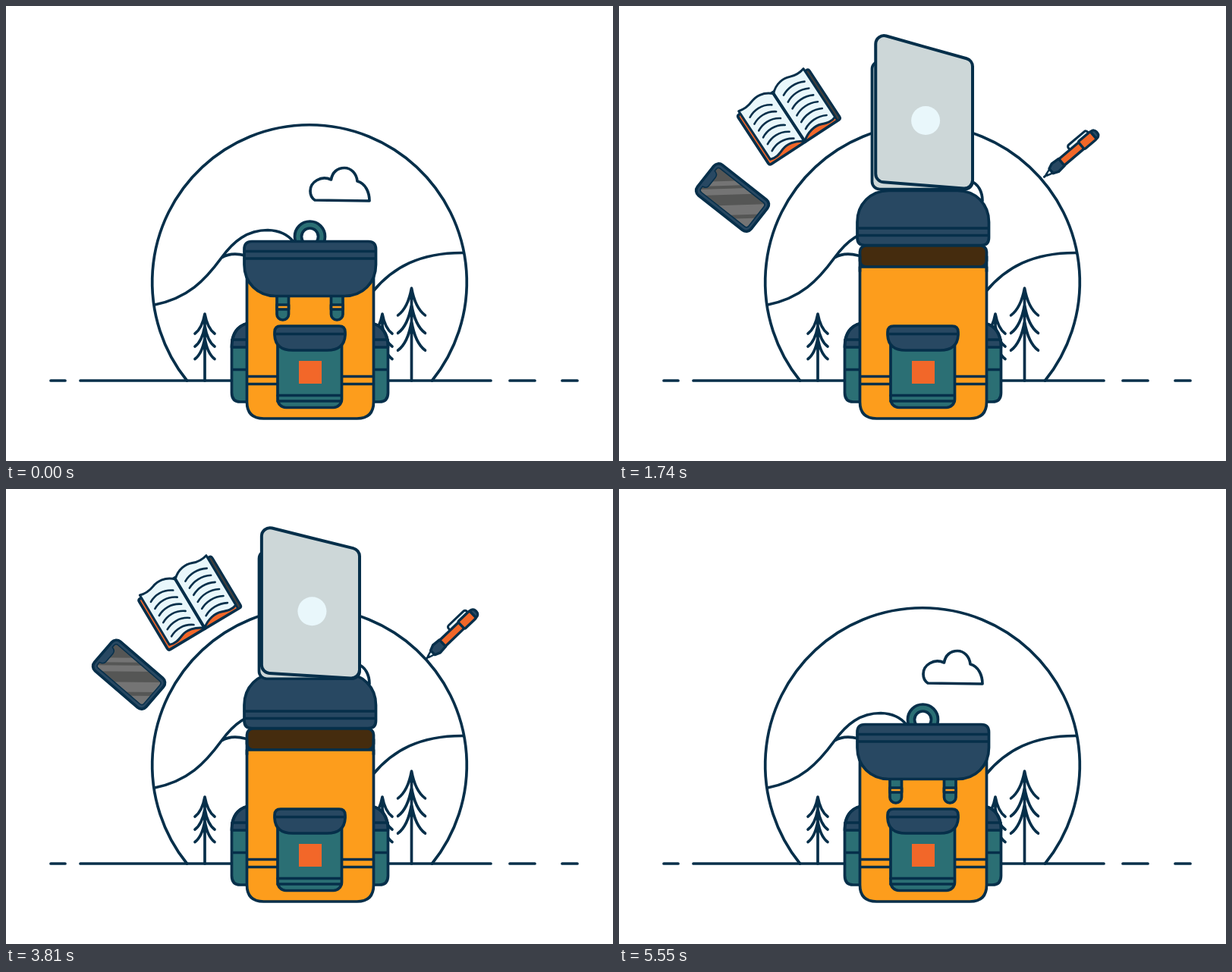
An HTML page with a canvas for the animation above (5610 ms loop, 800 by 600 pixels).

```html
<!DOCTYPE html>
<html lang="en">
<head>
<meta charset="utf-8">
<title>Backpack</title>
<style>
  html, body { margin: 0; width: 100%; height: 100%; overflow: hidden; background: #fff; }
  canvas { display: block; }
</style>
</head>
<body>
<canvas id="stage" width="800" height="600"></canvas>
<script>
const ctx = document.getElementById('stage').getContext('2d');
const LOOP = 5610, STEP = 30, MIDDLE = 2700;
const INK = '#062f4a', NAVY = '#284862', TEAL = '#2b6f74', AMBER = '#fd9d1c',
      ORANGE = '#f26729', BROWN = '#452c0e', SILVER = '#cdd7d8', PAPER = '#e9f7fb';

// Poses are keyed by the time distance from the middle of the flight.
const KEYS = [0, 585, 1050, 1290, 1560, 1740, 2040];
const PHONE = [[134, 260, -55.5], [135.5, 260, -54.5], [156, 249, -50.5], [192.5, 228, -43.5],
               [263.5, 228, -33], [324.5, 275, -23], [362, 397, -8]];
const BOOK = [[202.5, 141, -37], [204, 142, -36], [233, 149, -32], [284, 164, -25],
              [351, 224, -9], [386, 304, 6], [390, 397, 10]];
const PEN = [[608, 200, 55], [606, 200, 53.6], [591, 194, 48], [566.5, 186, 38],
             [513, 186.5, 17.5], [455, 226.5, -6.3], [440, 397, -14]];
// laptop: top, lid left shift, lid upper left lift, lid lower left lift
const LAPTOP = [[60.5, 8, 41, 14], [62, 7, 40, 13], [76, 4, 34, 9], [102, 1, 23, 4],
                [155, -2, 6, 0], [227, 0, 0, 0], [347, 0, 0, 0]];

const clamp = v => Math.min(1, Math.max(0, v));
const ramp = (t, a, b) => clamp((t - a) / (b - a));
const ease = v => v < .5 ? 4 * v ** 3 : 1 - (2 - 2 * v) ** 3 / 2;

// Smooth interpolation through the keyed poses.
function pose(rows, time) {
  let i = 0;
  while (i < KEYS.length - 2 && time > KEYS[i + 1]) i++;
  const span = KEYS[i + 1] - KEYS[i], u = clamp((time - KEYS[i]) / span);
  return rows[0].map((_, c) => {
    const slope = k => {
      if (k === 0) return 0;
      const n = Math.min(k + 1, KEYS.length - 1);
      return (rows[n][c] - rows[k - 1][c]) / (KEYS[n] - KEYS[k - 1]);
    };
    const a = rows[i][c], b = rows[i + 1][c];
    return a + (b - a) * u * u * (3 - 2 * u)
      + span * u * (1 - u) * (slope(i) * (1 - u) - slope(i + 1) * u);
  });
}

function paint(shape, fill, width = 3.7, line = INK) {
  const p = typeof shape === 'string' ? new Path2D(shape) : shape;
  if (fill) { ctx.fillStyle = fill; ctx.fill(p); }
  if (width) { ctx.strokeStyle = line; ctx.lineWidth = width; ctx.stroke(p); }
}

function box(x, y, w, h, r) {
  const p = new Path2D();
  p.roundRect(x, y, w, h, r);
  return p;
}

function disc(x, y, r) {
  const p = new Path2D();
  p.arc(x, y, r, 0, 7);
  return p;
}

function roundPoly(pts, r) {
  const p = new Path2D(), n = pts.length, [a, b] = pts;
  p.moveTo((a[0] + b[0]) / 2, (a[1] + b[1]) / 2);
  for (let i = 1; i <= n; i++) p.arcTo(...pts[i % n], ...pts[(i + 1) % n], r);
  p.closePath();
  return p;
}

function placed([x, y, deg], draw) {
  ctx.save();
  ctx.translate(x, y);
  ctx.rotate(deg * Math.PI / 180);
  draw();
  ctx.restore();
}

function tree(x, top, k) {
  let d = `M${x} ${top}V494`;
  for (const [from, to] of [[0, 26], [16, 43], [32, 59.5]])
    for (const side of [-1, 1])
      d += `M${x} ${top + from * k}Q${x + side * 3.5 * k} ${top + (to - 7) * k} ${x + side * 13 * k} ${top + to * k}`;
  paint(d);
}

function scenery() {
  paint('M238.5 494A207.3 207.3 0 1 1 561.5 494');
  paint('M196 394C240 385 262 362 284 332C300 310 318 295.5 345 295.5C362 296 372 302 379 311M284 332Q297 324 315 329');
  paint('M484 376C510 345 545 325 603 325.5');
  paint('M407 256L479 257C479 246 474 234 463 231C462 221 455 213.5 446 213.5C437 213.5 430 219 428.5 229C415 223 401 232 401 244C401 250 404 254 407 256Z', '#fff');
  tree(262, 406, 1);
  tree(496, 406, 1);
  tree(534.5, 372, 1.38);
  paint('M59 494H78M98 494H639M664 494H697M733 494H753');
}

function sidePocket() {
  paint('M318 418.5Q298 424 297.5 447V510Q297.5 522 309 522H318Z', TEAL);
  paint('M318 418.5Q298 424 297.5 450H318Z', NAVY);
  paint('M298 440H318M298 479.5H318');
}

function bag() {
  sidePocket();
  ctx.save();
  ctx.translate(801, 0);
  ctx.scale(-1, 1);
  sidePocket();
  ctx.restore();

  paint('M317.5 344H484.5V522Q484.5 544 462.5 544H339.5Q317.5 544 317.5 522Z', AMBER);
  paint('M318 488.5H484M318 498.5H484M317.5 330V350M484.5 330V350');
  paint(box(358, 436, 84.5, 93.5, [0, 0, 11, 11]), TEAL);
  paint('M358 513.5H442M358 521H442');
  paint('M362 422H439Q447 422 447 430V434Q446 454 423 454H378Q355 454 354 434V430Q354 422 362 422Z', NAVY);
  paint('M354.5 432.5H446.5');
  paint(box(386, 468, 30, 30, 0), ORANGE, 0);
}

// fold: 1 hangs closed, -1 stands open; drop lowers the loosened straps
function flap(fold, drop) {
  const folded = (shape, fill) => {
    const p = new Path2D();
    p.addPath(typeof shape === 'string' ? new Path2D(shape) : shape, new DOMMatrix([1, 0, 0, fold, 0, 313]));
    paint(p, fill);
  };
  if (fold > 0) for (const x of [357, 428.5]) {
    folded(box(x, 60, 15.5, 41 + drop, [0, 0, 7.5, 7.5]), TEAL);
    folded(box(x, 81 + drop, 15.5, 6, 0), AMBER);
  }
  folded('M324 -2.5H477.5Q487.5 -2.5 487.5 7.5V28C487.5 52 470 69.5 446 69.5H355.5C331.5 69.5 314 52 314 28V7.5Q314 -2.5 324 -2.5Z', NAVY);
  folded('M314.5 10.5H487M314.5 20H487');
}

function handle() {
  paint(disc(400.5, 304, 20), TEAL);
  paint(disc(400.5, 304, 11), '#fff');
}

function laptop([top, dx, liftTop, liftBottom]) {
  const left = 333.5, right = 466, bottom = top + 170;
  paint(box(left, top + 1.5, right - left, 168.5, 10), SILVER);
  paint(roundPoly([[left + dx, top - liftTop], [right, top], [right, bottom], [left + dx, bottom - liftBottom]], 11), SILVER, 4);
  paint(disc((left + dx + right) / 2 + 2, (top + bottom) / 2 - (liftTop + liftBottom) / 4 + 6, 19), PAPER, 0);
}

function phone() {
  paint(box(-25.5, -45, 51, 90, 8), NAVY);
  ctx.save();
  ctx.clip(new Path2D('M-20 -36Q-20 -40 -16 -40H-13Q-12 -34 -7 -34H7Q12 -34 13 -40H16Q20 -40 20 -36V36Q20 40 16 40H-16Q-20 40 -20 36Z'));
  paint(box(-30, -50, 60, 100, 0), '#747474', 0);
  ctx.rotate(.87);
  for (const [y, h] of [[-60, 38], [-16, 4], [-4, 14], [23, 5]])
    paint(box(-70, y, 140, h, 0), '#555655', 0);
  ctx.restore();
  paint('M-20 -36Q-20 -40 -16 -40H-13Q-12 -34 -7 -34H7Q12 -34 13 -40H16Q20 -40 20 -36V36Q20 40 16 40H-16Q-20 40 -20 36Z', null, 1.5);
}

function book() {
  paint('M-53 -39H0V39H-53Q-56 39 -56 36V-36Q-56 -39 -53 -39Z', ORANGE);
  paint('M0 -39H53Q56 -39 56 -36V36Q56 39 53 39H0Z', ORANGE);
  paint('M51 -39H53Q56 -39 56 -36V36Q56 39 53 39H51Z', '#45403c', 2.5);
  for (const side of [-1, 1]) {
    const x = v => side * v;
    paint(`M0 -37C${x(10)} -47 ${x(22)} -47 ${x(30)} -44S${x(44)} -41 ${x(51)} -43V33C${x(44)} 36 ${x(38)} 34 ${x(30)} 31S${x(10)} 30 0 38Z`, PAPER, 3);
    let lines = '';
    for (let i = 0; i < 6; i++) {
      const y = -28 + i * 10.6, from = side < 0 ? -43 : 10;
      lines += `M${from} ${y}C${from + 9} ${y - 5} ${from + 22} ${y - 6} ${from + 33} ${y + (side < 0 ? 2 : 0)}`;
    }
    paint(lines, null, 2.6);
  }
  paint('M0 -37V38', null, 4);
}

function pen() {
  paint(box(-11.5, -36, 8, 33, 3), PAPER, 3);
  paint(box(-6, -45, 12, 12, 5), NAVY, 3.4);
  paint(box(-5.5, -20, 11, 38, 1), ORANGE, 3.4);
  paint(box(-6.5, -39, 13, 21, 2), ORANGE, 3.4);
  paint('M-4 32H4L1 42H-1Z', PAPER, 2.4);
  paint('M0 41V46', null, 3);
  paint('M-6 16H6L7 27L4 34H-4L-7 27Z', NAVY, 3.4);
}

function draw(t) {
  const away = Math.abs(t - MIDDLE);
  const fold = 1 - 2 * (ease(ramp(t, 420, 690)) - ease(ramp(t, 4600, 5160)));
  const drop = 28 * (ease(ramp(t, 330, 440)) - ease(ramp(t, 5430, 5550)));

  ctx.fillStyle = '#fff';
  ctx.fillRect(0, 0, 800, 600);
  scenery();
  handle();
  if (fold <= 0) flap(fold, drop);
  paint(box(317.5, 316, 167, 28, 8), BROWN);

  if (away < 2040) {
    ctx.save();
    ctx.beginPath();
    ctx.rect(0, 0, 800, 344);
    ctx.clip();
    laptop(pose(LAPTOP, away));
    placed(pose(PHONE, away), phone);
    placed(pose(BOOK, away), book);
    placed(pose(PEN, away), pen);
    ctx.restore();
  }

  bag();
  if (fold > 0) flap(fold, drop);
}

ctx.lineCap = ctx.lineJoin = 'round';
const start = performance.now();
function tick() {
  const t = (performance.now() - start) % LOOP;
  draw(Math.floor(t / STEP) * STEP);
  requestAnimationFrame(tick);
}
tick();
</script>
</body>
</html>
```
